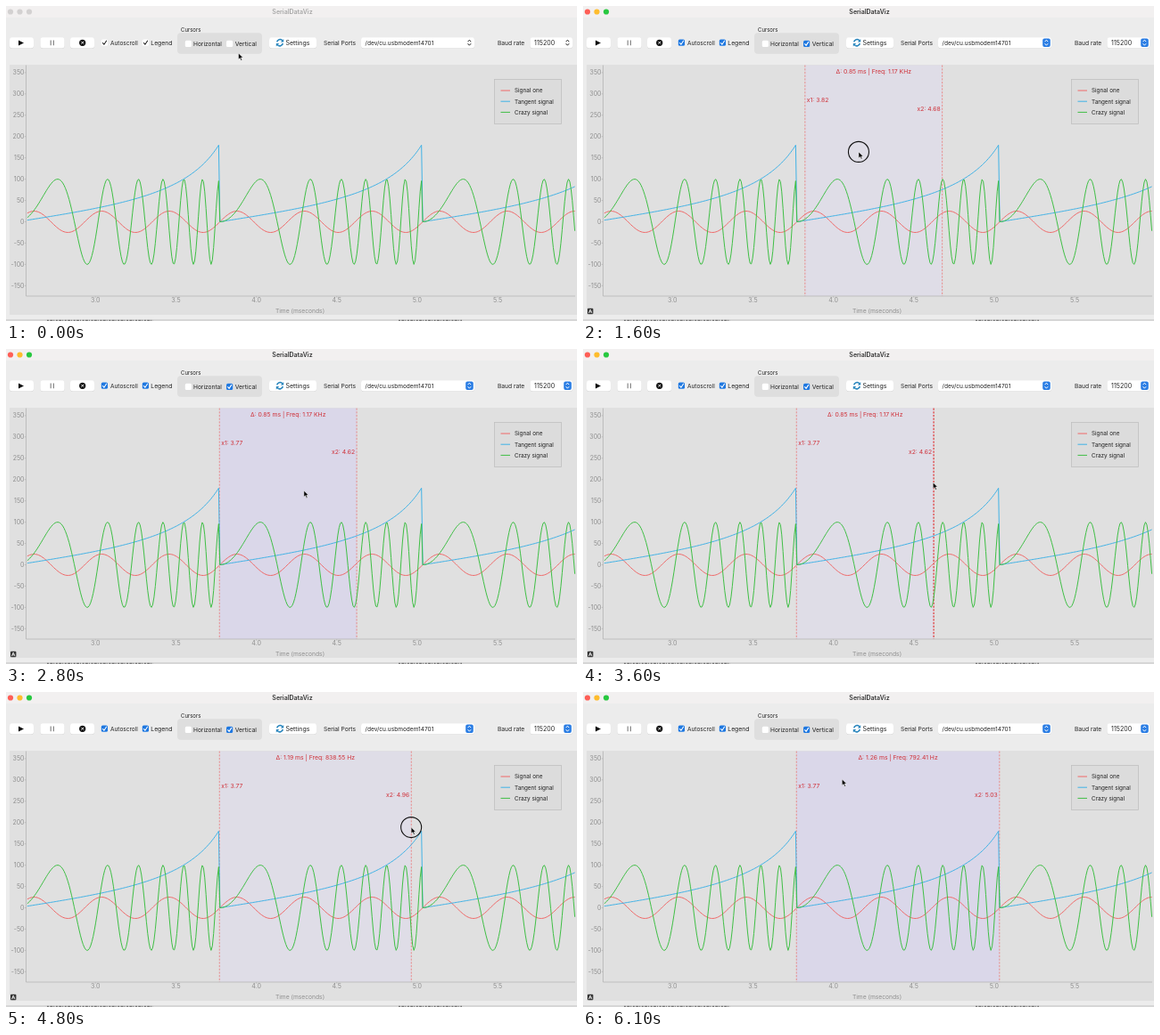
Write an HTML page that moves like this. It is 640x354 px and loops after 6200 ms.

```html
<!DOCTYPE html>
<html lang="en">
<head>
<meta charset="utf-8">
<title>SerialDataViz</title>
<style>
  html, body { margin: 0; width: 100%; height: 100%; overflow: hidden; background: #ececec; }
  svg { display: block; width: 100vw; height: 100vh; }
  text { font-family: Inter, Roboto, sans-serif; white-space: pre; }
  .focus { display: none; }
  .active .focus { display: inline; }
  .active .blur { display: none; }
  #title { fill: #a6a6a6; }
  .active #title { fill: #333; }
  .curve { fill: none; stroke-width: 1; stroke-linejoin: round; }
  .edge { stroke: #e88484; stroke-width: .9; stroke-dasharray: 2.2 1.5; }
  .edge.hot { stroke: #e02828; stroke-width: 1.1; }
  #region text { fill: #cf3038; font-size: 6.8px; }
</style>
</head>
<body>
<svg id="stage" viewBox="0 0 640 354"></svg>
<script>
const LOOP = 6200, FRAME = 100;
const RED = '#f06868', BLUE = '#3fb2e6', GREEN = '#3fbf45';
const PLOT = { left: 22.5, right: 638, top: 66.5, bottom: 326 };

const toX = ms => 239.1 + 180.3 * (ms - 3.77);
const toY = v => 242.5 - 0.479 * v;

const rect = (x, y, w, h, fill, r = 0, extra = '') =>
  `<rect x="${x}" y="${y}" width="${w}" height="${h}" rx="${r}" fill="${fill}" ${extra}/>`;
const line = (x1, y1, x2, y2, color, w = 1) =>
  `<path d="M${x1} ${y1}L${x2} ${y2}" stroke="${color}" stroke-width="${w}"/>`;
const label = (x, y, s, size = 6.7, fill = '#222', extra = '') =>
  `<text x="${x}" y="${y}" font-size="${size}" fill="${fill}" ${extra}>${s}</text>`;
const middle = 'text-anchor="middle"', end = 'text-anchor="end"';

// Signals all restart with the same period.
function curve(fn, color) {
  const period = 227.3, origin = 239.8, samples = 160, span = 2 * Math.PI / 5;
  const points = [];
  for (let cycle = -1; cycle < 2; cycle++)
    for (let i = 0; i < samples; i++) {
      const x = origin + period * (cycle + i / samples);
      if (x >= PLOT.left && x <= PLOT.right)
        points.push(x.toFixed(2) + ',' + toY(fn(span * i / samples)).toFixed(2));
    }
  return `<polyline class="curve" stroke="${color}" points="${points.join(' ')}"/>`;
}

const button = (x, w) =>
  rect(x, 35.7, w, 12.2, '#cfcfcf', 3) + rect(x, 35.2, w, 12.2, '#fff', 3);

function checkbox(x, y, checked) {
  const tick = color =>
    `<path d="M${x + 1.6} ${y + 3.9}l1.5 1.7l2.6 -4" fill="none" stroke="${color}" stroke-width="1.1" stroke-linecap="round"/>`;
  const box = rect(x, y, 7.2, 7.2, '#fff', 1.6);
  if (checked === false) return box;
  const on = `<g class="focus">${rect(x, y, 7.2, 7.2, '#1f78e0', 1.6)}${tick('#fff')}</g>`;
  return box + on + (checked === 'late' ? '' : `<g class="blur">${tick('#222')}</g>`);
}

function combo(x, w, s, size) {
  const cx = x + w - 5.6;
  const arrows = color =>
    `<path d="M${cx - 1.8} 40.2l1.8 -2l1.8 2M${cx - 1.8} 42.2l1.8 2l1.8 -2" fill="none" stroke="${color}" stroke-width="1"/>`;
  return button(x, w) + label(x + 4.6, 43.6, s, size) +
    `<g class="blur">${arrows('#222')}</g>` +
    `<g class="focus">${rect(cx - 4.2, 36.5, 8.6, 9.6, '#2a7de4', 2)}${arrows('#fff')}</g>`;
}

function windowFrame() {
  const lights = ['#fe5f57', '#febc2e', '#28c840'].map((color, i) => {
    const at = `cx="${5 + i * 10.5}" cy="6.5" r="3.1"`;
    return `<circle class="blur" ${at} fill="#d3d1d1"/><circle class="focus" ${at} fill="${color}"/>`;
  }).join('');
  return rect(0, 0, 640, 354, '#ececec') + rect(0, 0, 640, 13, '#f2f0f0') + lights +
    `<text id="title" x="321" y="9" font-size="7" font-weight="600" ${middle}>SerialDataViz</text>`;
}

function toolbar() {
  return button(4, 27) + '<path d="M14 38.4v6l6 -3z" fill="#111"/>' +
    button(38.5, 27) + line(50.2, 38.6, 50.2, 44.2, '#888', 1.2) + line(53.4, 38.6, 53.4, 44.2, '#888', 1.2) +
    button(72, 27) + '<circle cx="85.7" cy="41.3" r="3.6" fill="#111"/>' +
    '<path d="M84.3 39.9l2.8 2.8m0 -2.8l-2.8 2.8" stroke="#fff" stroke-width=".9"/>' +
    checkbox(106.8, 37.6, true) + label(117, 43.7, 'Autoscroll', 6.5) +
    checkbox(152.8, 37.6, true) + label(162.3, 43.7, 'Legend', 6.8) +
    label(196, 29, 'Cursors', 6) + rect(192, 30.3, 95, 23.5, '#dedede', 4) +
    checkbox(200.8, 38.8, false) + label(210, 44.8, 'Horizontal', 6.6) +
    checkbox(247, 38.8, 'late') + label(256.7, 44.8, 'Vertical', 6.8) +
    button(295, 53) +
    '<g fill="none" stroke="#2b86bd" stroke-width="1.6"><path d="M303.7 40.4a3.5 3.5 0 0 1 6 -1.7M310.3 42a3.5 3.5 0 0 1 -6 1.7"/></g>' +
    '<path d="M311.2 37v3.4h-3.4zM302.8 45.4v-3.4h3.4z" fill="#2b86bd"/>' +
    label(313.5, 43.7, 'Settings', 7) +
    label(356, 43.7, 'Serial Ports', 6.65) + combo(398, 127, '/dev/cu.usbmodem14701', 6.55) +
    label(551, 43.7, 'Baud rate', 6.65) + combo(587.5, 47.5, '115200', 7);
}

function axes() {
  const gray = '#8f8f8f', rule = '#b4b4b4';
  let out = line(PLOT.left, PLOT.top, PLOT.left, PLOT.bottom, rule, .8) +
    line(PLOT.left, PLOT.bottom, PLOT.right, PLOT.bottom, rule, .8);
  for (let v = -150; v <= 350; v += 50)
    out += line(20.7, toY(v), PLOT.left, toY(v), rule, .7) + label(20.5, toY(v) + 2.5, v, 7, gray, end);
  for (let t = 3; t < 6; t += .5)
    out += line(toX(t), 326, toX(t), 327.8, rule, .7) + label(toX(t), 333, t.toFixed(1), 7.1, gray, middle);
  return out + label(329.5, 344.7, 'Time (mseconds)', 6.7, gray, middle);
}

function legend() {
  const rows = [['Signal one', RED], ['Tangent signal', BLUE], ['Crazy signal', GREEN]];
  return rect(547.5, 82.5, 75, 50, '#dcdcdc', 0, 'stroke="#c0c0c0" stroke-width=".8"') +
    rows.map(([name, color], i) => {
      const y = 95 + i * 12.2;
      return line(554.5, y, 565, y, color) + label(570, y + 2.4, name, 6.35);
    }).join('');
}

const stage = document.getElementById('stage');
stage.innerHTML = windowFrame() + toolbar() +
  rect(4, 66, 636, 281, '#e0e0e0') +
  `<g id="region">
     <rect id="band" y="${PLOT.top}" height="${PLOT.bottom - PLOT.top}"/>
   </g>` +
  axes() +
  curve(t => 25 * Math.sin(15 * t), RED) +
  curve(t => 60 * Math.tan(t), BLUE) +
  curve(t => 100 * Math.sin(25 * t * t), GREEN) +
  legend() +
  `<g id="auto">${rect(5, 339.8, 6.4, 6.4, '#333', 1)}
     <path d="M6.4 345.2l1.8 -4.2l1.8 4.2m-3 -1.4h2.4" fill="none" stroke="#fff" stroke-width=".8"/></g>` +
  rect(0, 352, 640, 2, '#d6d6d6') +
  '<path d="M46 353.3H165M440 353.3H511" stroke="#777" stroke-width="1.3" stroke-dasharray="2 1.3 3 1 1 1.6"/>' +
  `<circle id="press" r="11.5" fill="none" stroke="#111" stroke-width="1.1"/>
   <path id="pointer" d="M0 0V7L1.7 5.5L2.9 8.2L4.1 7.7L2.9 5.1H5.1Z" fill="#000" stroke="#fff" stroke-width=".5"/>`;

document.getElementById('region').insertAdjacentHTML('beforeend',
  `<path id="edge1" class="edge" d="M0 ${PLOT.top}V${PLOT.bottom}"/>
   <path id="edge2" class="edge" d="M0 ${PLOT.top}V${PLOT.bottom}"/>
   <text id="delta" y="75.6" ${middle}></text>
   <text id="name1" y="108.3"></text>
   <text id="name2" y="118" ${end}></text>`);

const el = Object.fromEntries(
  ['region', 'band', 'edge1', 'edge2', 'delta', 'name1', 'name2', 'auto', 'press', 'pointer']
    .map(id => [id, document.getElementById(id)]));

// time, pointer x, pointer y, first cursor (ms), distance between cursors (ms)
const STEPS = [
  [0, 260.5, 53, 3.853, .853],
  [200, 251, 43, 3.853, .853],
  [400, 251, 43, 3.853, .853],
  [500, 252, 46, 3.853, .853],
  [900, 304.5, 160.5, 3.853, .853],
  [1100, 314.2, 164, 3.853, .853],
  [1300, 314.2, 164, 3.853, .853],
  [2100, 300.2, 163.7, 3.776, .853],
  [2300, 299.3, 163.5, 3.771, .853],
  [2500, 299.3, 163.5, 3.771, .853],
  [3300, 391.5, 152, 3.771, .853],
  [3600, 392.3, 150, 3.771, .853],
  [3900, 392.6, 150, 3.771, .853],
  [4400, 443.5, 151.5, 3.771, 1.12604],
  [5200, 464.8, 152.7, 3.771, 1.25902],
  [5400, 465.4, 152.7, 3.771, 1.261973],
  [5500, 465.4, 152.7, 3.771, 1.261973],
  [6100, 290.3, 98, 3.771, 1.261973]
];
const DRAGS = [[1300, 2400], [3800, 5500]];

function poseAt(t) {
  const next = STEPS.findIndex(s => s[0] > t);
  if (next < 0) return STEPS[STEPS.length - 1].slice(1);
  const a = STEPS[next - 1], b = STEPS[next], k = (t - a[0]) / (b[0] - a[0]);
  return a.slice(1).map((v, i) => v + (b[i + 1] - v) * k);
}

const show = (node, on) => { node.style.display = on ? '' : 'none'; };
const move = (node, x, y = 0) => node.setAttribute('transform', `translate(${x} ${y})`);
const write = (node, x, s) => { node.setAttribute('x', x); node.textContent = s; };

function render(t) {
  const [px, py, start, gap] = poseAt(t);
  const x1 = toX(start), x2 = toX(start + gap);
  const active = t >= 500;
  const pressed = DRAGS.some(([from, to]) => t >= from && t < to);
  const free = !pressed && py > PLOT.top;
  const near = x => free && Math.abs(px - x) < 3;
  const inside = free && px > x1 && px < x2 && !near(x1) && !near(x2);
  const freq = 1000 / gap;

  stage.classList.toggle('active', active);
  show(el.region, active);
  show(el.auto, active && py > PLOT.top);
  show(el.press, pressed);
  move(el.press, px, py);
  move(el.pointer, px, py);

  el.band.setAttribute('x', x1);
  el.band.setAttribute('width', x2 - x1);
  el.band.setAttribute('fill', inside ? '#dad7e9' : '#dfdde7');
  move(el.edge1, x1);
  move(el.edge2, x2);
  el.edge1.classList.toggle('hot', near(x1));
  el.edge2.classList.toggle('hot', near(x2));
  write(el.name1, x1 + 2, `x1: ${start.toFixed(2)}`);
  write(el.name2, x2 - 2, `x2: ${(start + gap).toFixed(2)}`);
  write(el.delta, (x1 + x2) / 2, `Δ: ${gap.toFixed(2)} ms | Freq: ` +
    (freq >= 1000 ? `${(freq / 1000).toFixed(2)} KHz` : `${freq.toFixed(2)} Hz`));
}

const begin = performance.now();
function tick() {
  const t = (performance.now() - begin) % LOOP;
  render(Math.floor(t / FRAME) * FRAME);
  requestAnimationFrame(tick);
}
tick();
</script>
</body>
</html>
```
